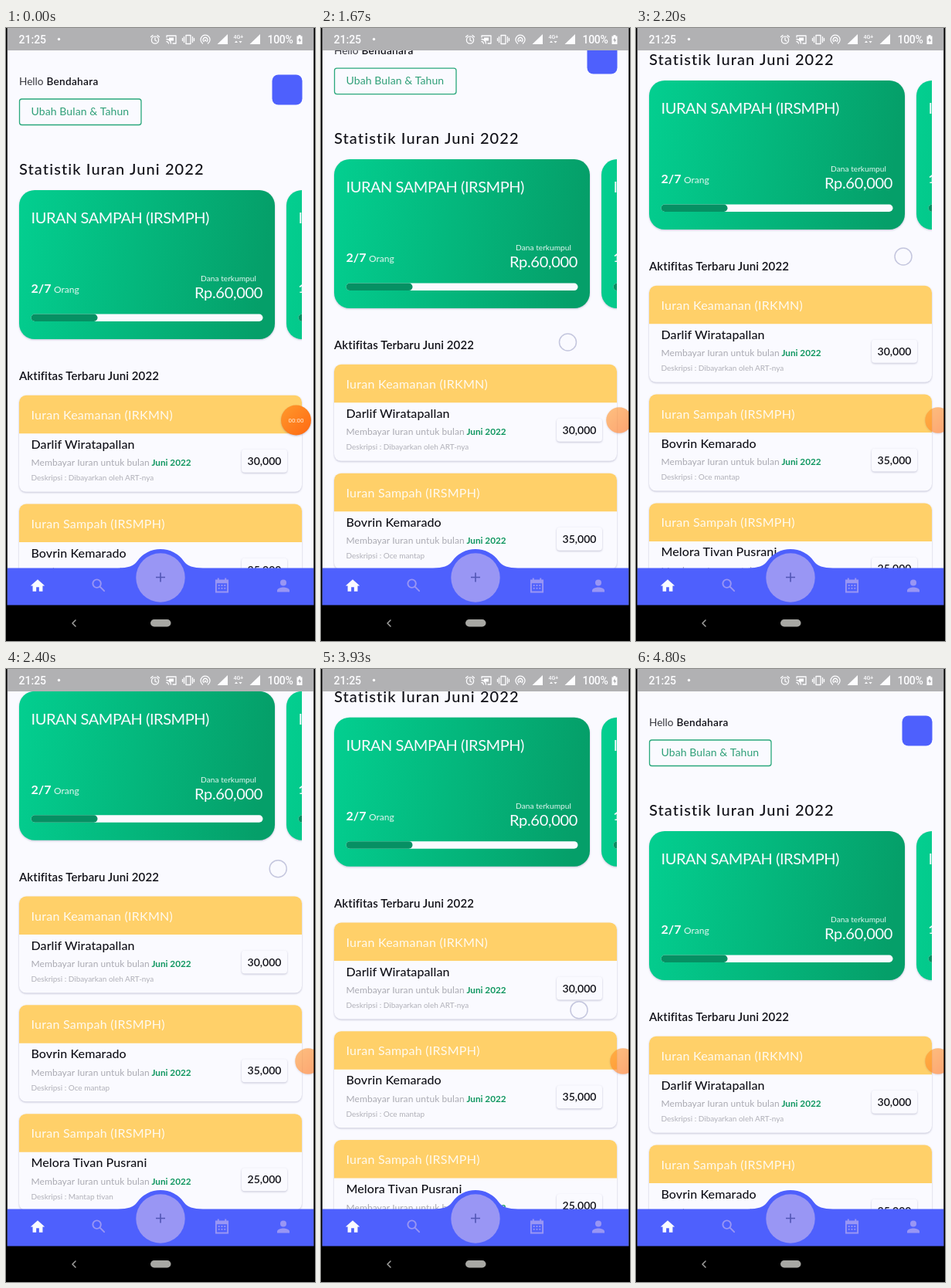
Recreate the animation shown at these times as an HTML page. Size 400 px wide and 794 px high, loop 5070 ms.

```html
<!DOCTYPE html>
<html lang="id">
<head>
<meta charset="utf-8">
<title>Statistik Iuran</title>
<style>
  html, body { margin: 0; width: 100%; height: 100%; overflow: hidden; background: #000; }
  svg { display: block; width: 100%; height: 100%; }
  text { font-family: Lato, sans-serif; white-space: pre; }
  .status text, #timer { font-family: Roboto, sans-serif; }
  .soft { filter: drop-shadow(0 1px 1px rgba(70, 70, 120, .3)); }
  .line { fill: none; stroke: currentColor; stroke-linecap: round; stroke-linejoin: round; }
</style>
</head>
<body>
<svg id="stage" viewBox="0 0 400 794"></svg>
<script>
const LOOP = 5070;
const PAPER = '#fafaff', INK = '#111118', BLUE = '#4e60fd', LILAC = '#9996f4';

const text = (x, y, size, fill, content, { weight = 400, spacing = 0, anchor = 'start' } = {}) =>
  `<text x="${x}" y="${y}" font-size="${size}" fill="${fill}" font-weight="${weight}"
    letter-spacing="${spacing}" text-anchor="${anchor}">${content}</text>`;

const rect = (x, y, w, h, r, fill, extra = '') =>
  `<rect x="${x}" y="${y}" width="${w}" height="${h}" rx="${r}" fill="${fill}" ${extra}/>`;

const icon = (x, y, scale, color, shapes) =>
  `<g transform="translate(${x} ${y}) scale(${scale}) translate(-12 -12)" fill="${color}" color="${color}">${shapes}</g>`;

const duesCard = (x, title, paid) => `
  <g transform="translate(${x} 210)">
    ${rect(0, 0, 331, 193, 20, 'url(#green)', 'class="soft"')}
    ${text(15.5, 43, 20, PAPER, title, { spacing: -.45 })}
    ${text(15.5, 133, 16, PAPER, paid, { weight: 700 })}
    ${text(45, 133, 12, '#e2f6f0', 'Orang')}
    ${text(271, 118, 10.2, '#e2f6f0', 'Dana terkumpul', { anchor: 'middle' })}
    ${text(271, 140, 20, PAPER, 'Rp.60,000', { spacing: -.3, anchor: 'middle' })}
    ${rect(15.5, 160.5, 300, 9.5, 4.75, PAPER)}
    ${rect(15.5, 160.5, 86, 9.5, 4.75, '#069063')}
  </g>`;

const activities = [
  ['Iuran Keamanan (IRKMN)', 'Darlif Wiratapallan', 'Dibayarkan oleh ART-nya', '30,000'],
  ['Iuran Sampah (IRSMPH)', 'Bovrin Kemarado', 'Oce mantap', '35,000'],
  ['Iuran Sampah (IRSMPH)', 'Melora Tivan Pusrani', 'Mantap tivan', '25,000'],
];

const activityCard = ([title, name, note, amount], i) => `
  <g transform="translate(17 ${475.8 + i * 140.8})">
    ${rect(0, 0, 366, 125, 9, PAPER, 'class="soft"')}
    <path d="M0 49.5V9a9 9 0 0 1 9-9h348a9 9 0 0 1 9 9v40.5z" fill="#ffd069"/>
    ${text(15.5, 31, 16, '#fffaf0', title, { spacing: .25 })}
    ${text(15.5, 69, 16, INK, name, { weight: 500, spacing: .1 })}
    ${text(15.5, 91.5, 12, '#aaaab2', 'Membayar Iuran untuk bulan', { spacing: .08 })}
    ${text(171.5, 91.5, 11.7, '#0e965f', 'Juni 2022', { weight: 700 })}
    ${text(15.5, 110.5, 10, '#b0b0b8', 'Deskripsi : ' + note)}
    ${rect(288, 70, 59, 30, 4, PAPER, 'class="soft"')}
    ${text(317.5, 90, 14, INK, amount, { weight: 600, anchor: 'middle' })}
  </g>`;

const page = `
  ${text(17, 74, 13.6, '#35353c', 'Hello')}
  ${text(52.5, 74, 13.6, INK, 'Bendahara', { weight: 600, spacing: .3 })}
  ${rect(17.5, 92, 157.5, 33.5, 3, 'none', 'stroke="#2aa87c" stroke-width="1.3"')}
  ${text(32.5, 113, 14, '#2f9f78', 'Ubah Bulan &amp; Tahun', { spacing: .1 })}
  ${rect(344.5, 60.5, 39, 39, 8, BLUE)}
  ${text(17, 190, 20, INK, 'Statistik Iuran Juni 2022', { weight: 500, spacing: 1.1 })}
  <g clip-path="url(#carousel)">
    ${duesCard(17, 'IURAN SAMPAH (IRSMPH)', '2/7')}
    ${duesCard(363, 'IURAN KEAMANAN (IRKMN)', '1/7')}
  </g>
  ${text(17, 456, 15, INK, 'Aktifitas Terbaru Juni 2022', { weight: 600, spacing: .1 })}
  ${activities.map(activityCard).join('')}`;

const signal = x => `<path d="M${x} 21h13.5V8z"/>`;

const statusBar = `
  <g class="status" fill="#fdfdff" color="#fdfdff">
    ${rect(1.5, 0, 397, 29, 0, '#b1b1b3')}
    ${text(16.5, 20, 14, '#fdfdff', '21:25', { weight: 500 })}
    <circle cx="68.5" cy="14.5" r="1.7"/>
    <g class="line" stroke-width="1.3">
      <circle cx="193" cy="15.5" r="4.6"/>
      <path d="M193 13v3l2 1M187.5 11.5l2.5-2M198.5 11.5l-2.5-2"/>
      <path d="M208 12v-2h12v10h-4M208 14.5a6 6 0 0 1 5.5 5.5M208 17.5a3 3 0 0 1 2.5 2.5"/>
      <path d="M233 9.5h6v11h-6zM230.5 11.5v7M241.5 11.5v7M228.5 13.5v3M243.5 13.5v3"/>
      <path d="M254.5 20a6 6 0 1 1 7 0M256 17.5a3 3 0 1 1 4 0"/>
    </g>
    ${rect(211, 12.5, 6, 4, 0, '#fdfdff')}
    <circle cx="258" cy="16" r="1.3"/>
    ${signal(273.5)}
    ${text(294.5, 14, 7, '#fdfdff', '4G+', { weight: 500 })}
    <path d="M296 19l2-2.5 2 2.5zM301.5 17l2 2.5 2-2.5z"/>
    ${signal(315.5)}
    ${text(338.5, 20, 14, '#fdfdff', '100%', { weight: 500, spacing: -.3 })}
    <path d="M376.5 10.5h2v-1.5h3v1.5h2v10.5h-7z"/>
    <path d="M380.5 12l-2.3 4.3h1.7v3l2.2-4.3h-1.6z" fill="#a5a5a8"/>
  </g>`;

const bottomBar = `
  <path d="M1.5 699.5H145Q163.6 699.5 169.5 691A37 37 0 0 1 230.5 691Q236.4 699.5 255 699.5H398.5V748H1.5z" fill="${BLUE}"/>
  <circle cx="200" cy="712" r="31.7" fill="${LILAC}"/>
  <path d="M200 705.5v12M194 711.5h12" stroke="#5256b4" stroke-width="1.6"/>
  ${icon(41, 722.5, .92, PAPER, '<path d="M10 20v-6h4v6h5v-8h3L12 3 2 12h3v8z"/>')}
  ${icon(120, 722, .95, LILAC, '<g class="line" stroke-width="2"><circle cx="9.5" cy="9.5" r="5.5"/><path d="M14 14l5.5 5.5"/></g>')}
  ${icon(279.5, 722, .95, LILAC, `<path fill-rule="evenodd" d="M6 2h2v2h8V2h2v2h3v18H3V4h3zM5 9v11h14V9z"/>
    <path d="M7 11h2v2H7zm4 0h2v2h-2zm4 0h2v2h-2zM7 15h2v2H7zm4 0h2v2h-2zm4 0h2v2h-2z"/>`)}
  ${icon(359, 722.5, 1, LILAC, '<circle cx="12" cy="8" r="4"/><path d="M4 20v-2c0-2.7 5.3-4 8-4s8 1.3 8 4v2z"/>')}
  ${rect(0, 747.5, 400, 46.5, 0, '#000')}
  <path class="line" d="M90 767l-4 4 4 4" color="#a2a2a0" stroke-width="1.5"/>
  ${rect(187, 766, 26.5, 9.5, 4.75, '#a8a8a4')}`;

document.getElementById('stage').innerHTML = `
  <defs>
    <linearGradient id="green" x2="1" y2=".08">
      <stop stop-color="#03cf90"/><stop offset="1" stop-color="#059f69"/>
    </linearGradient>
    <linearGradient id="orange" x1="0" y1="0" x2="1" y2="1">
      <stop stop-color="#ff9a2c"/><stop offset="1" stop-color="#ff6812"/>
    </linearGradient>
    <clipPath id="carousel"><rect x="2" y="195" width="381" height="225"/></clipPath>
  </defs>
  ${rect(1.5, 0, 397, 748, 0, PAPER)}
  <g id="page">${page}</g>
  ${statusBar}
  ${bottomBar}
  <g id="recorder">
    <circle r="19.5" fill="url(#orange)" class="soft"/>
    <text id="timer" y="3" font-size="8" fill="#fff0dc" text-anchor="middle"></text>
  </g>
  <circle id="touch" r="11" fill="${PAPER}" fill-opacity=".35" stroke="#c4c6de" stroke-width="1.5"/>
  ${rect(0, 0, 1.5, 794, 0, '#000')}${rect(398.5, 0, 1.5, 794, 0, '#000')}`;

const [pageEl, recorder, timer, touch] =
  ['page', 'recorder', 'timer', 'touch'].map(id => document.getElementById(id));

// Keys are [time in ms, value], joined by straight lines.
function track(keys, t) {
  const next = keys.findIndex(key => key[0] > t);
  if (next < 0) return keys[keys.length - 1][1];
  if (next === 0) return keys[0][1];
  const [t0, a] = keys[next - 1], [t1, b] = keys[next];
  return a + (b - a) * (t - t0) / (t1 - t0);
}

const scroll = [[1330, 0], [1470, 9], [1667, 40], [2200, 142], [2470, 195], [2730, 229.5],
  [3750, 229.5], [3800, 218], [3933, 147.5], [4067, 65], [4200, 12], [4267, 0]];
const touches = [
  { from: 1390, to: 2650, x: [[1400, 312], [1667, 319.5], [2200, 346], [2650, 360]],
    y: [[1400, 452], [1667, 407], [2200, 296], [2650, 212]] },
  { from: 3720, to: 4320, x: [[3730, 329], [3933, 334], [4250, 342]],
    y: [[3730, 345], [3933, 441.5], [4200, 545]] },
];
const recorderX = [[1470, 375.5], [1667, 386], [1800, 391]];
const recorderScale = [[1470, 1], [1667, .86]];
const recorderAlpha = [[1400, 1], [1667, .6]];
const timerAlpha = [[1400, 1], [1600, 0]];

function draw(now) {
  const t = Math.floor((now % LOOP + 5) * .015) / .015;
  pageEl.setAttribute('transform', `translate(0 ${-track(scroll, t)})`);

  recorder.setAttribute('transform',
    `translate(${track(recorderX, t)} 508) scale(${track(recorderScale, t)})`);
  recorder.setAttribute('opacity', track(recorderAlpha, t));
  timer.setAttribute('opacity', track(timerAlpha, t));
  timer.textContent = t < 1195 ? '00:00' : '00:01';

  const active = touches.find(({ from, to }) => t >= from && t < to);
  touch.setAttribute('visibility', active ? 'visible' : 'hidden');
  if (active) {
    touch.setAttribute('cx', track(active.x, t));
    touch.setAttribute('cy', track(active.y, t));
  }
}

const start = performance.now();
function tick() {
  draw(performance.now() - start);
  requestAnimationFrame(tick);
}
tick();
</script>
</body>
</html>
```
